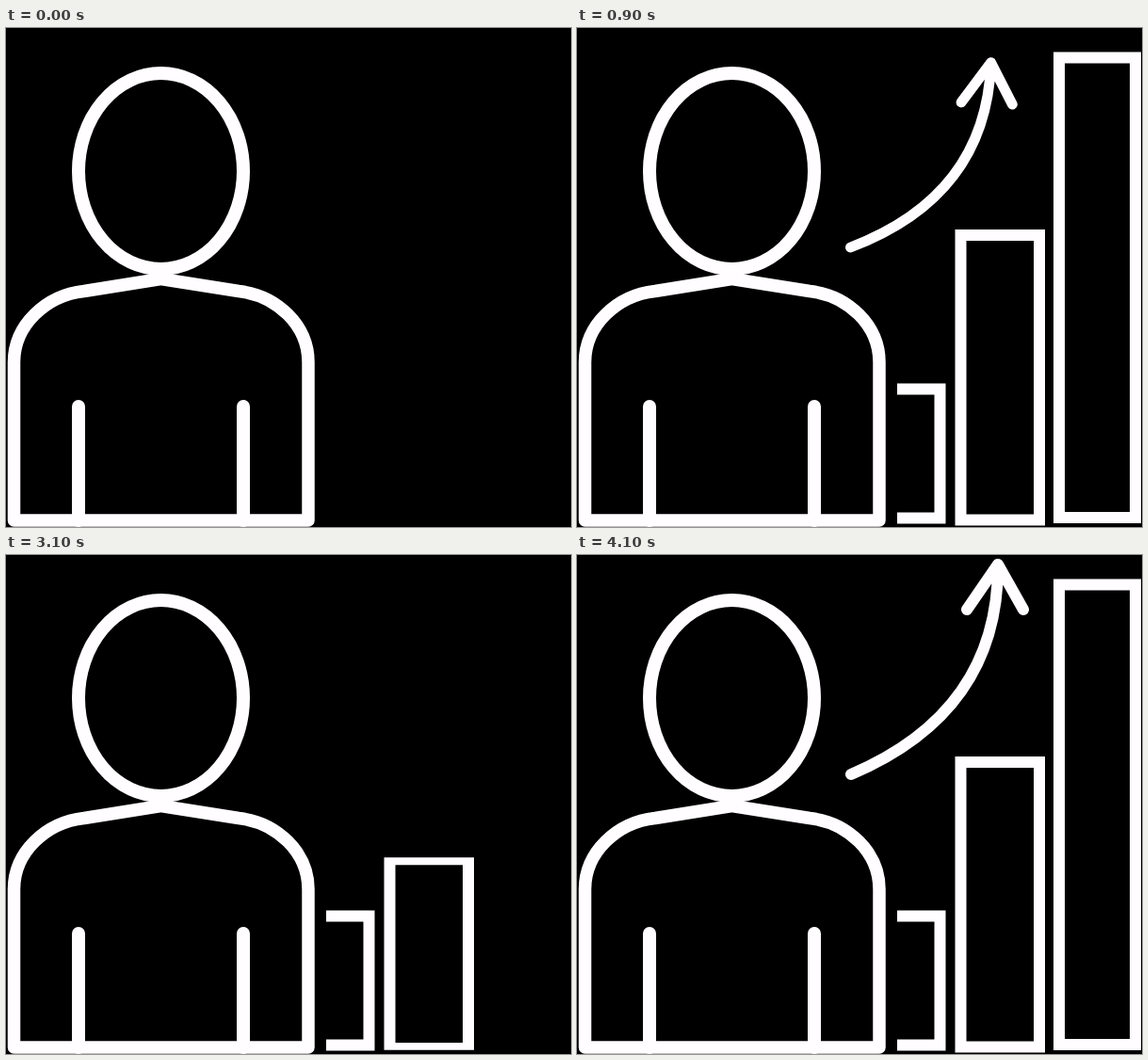
Animation, 600 px wide and 530 px high, one loop 5.4 s. Source, as an HTML page:

```html
<!DOCTYPE html>
<html lang="en">
<head>
<meta charset="utf-8">
<title>Growth</title>
<style>
  html, body { margin: 0; width: 100%; height: 100%; overflow: hidden; background: #000; }
  svg { display: block; width: 600px; height: 530px; }
  svg * { fill: none; stroke: #fffdff; }
  .round { stroke-linecap: round; stroke-linejoin: round; }
</style>
</head>
<body>
<svg viewBox="0 0 600 530">
  <g class="round" stroke-width="14">
    <ellipse cx="164.5" cy="152" rx="87.5" ry="104"/>
    <path stroke-width="13.5" d="M8.5 523V355C8.5 316 42 284 83 279.500L164.500 266.500L247 279.500C288 284 321 316 321 355V523Z"/>
    <path d="M77 402V523M252 402V523"/>
  </g>
  <g stroke-width="12">
    <path class="bar" d="M340 383.500H385.500V520.500H340"/>
    <path class="bar" d="M407.500 220H491V522.500H407.500Z"/>
    <path class="bar" d="M512 31.500H593V520H512Z"/>
  </g>
  <path id="arrow" class="round" stroke-width="12" d="M291 233C392 190 447 118 447 12M414 58L447 10L474 58"/>
</svg>
<script>
  const LOOP = 5400, CYCLE = 2700, STEP = 100;
  const LAG = 24;          // second run starts slightly late
  const BAR_MS = 267, BASE = 520.5;
  const ARROW_START = 542, ARROW_RATE = 0.0066, TILT = 24, SETTLED = 1400;
  const bars = document.querySelectorAll('.bar');
  const arrow = document.getElementById('arrow');

  const clamp = v => Math.min(1, Math.max(0, v));
  const easeOut = u => 1 - (1 - u) ** 2;

  function show(el, scale, transform) {
    el.setAttribute('visibility', scale > 0 ? 'visible' : 'hidden');
    el.setAttribute('transform', transform);
  }

  function arrowScale(t) {
    if (t >= SETTLED - LAG) return 1;
    return t <= ARROW_START ? 0 : 1 - Math.exp(-ARROW_RATE * (t - ARROW_START));
  }

  function draw(now) {
    const time = Math.floor((now % LOOP) / STEP) * STEP;
    const t = time < CYCLE ? time : time - CYCLE - LAG;

    bars.forEach((bar, i) => {
      const s = easeOut(clamp(t / BAR_MS - i));
      show(bar, s, `translate(0 ${BASE}) scale(1 ${s}) translate(0 ${-BASE})`);
    });

    const s = arrowScale(t);
    show(arrow, s, `translate(${285 + 6 * s} 233) rotate(${TILT * (1 - s)}) scale(${s}) translate(-291 -233)`);
  }

  const start = performance.now();
  function tick() {
    draw(performance.now() - start);
    requestAnimationFrame(tick);
  }
  tick();
</script>
</body>
</html>
```
